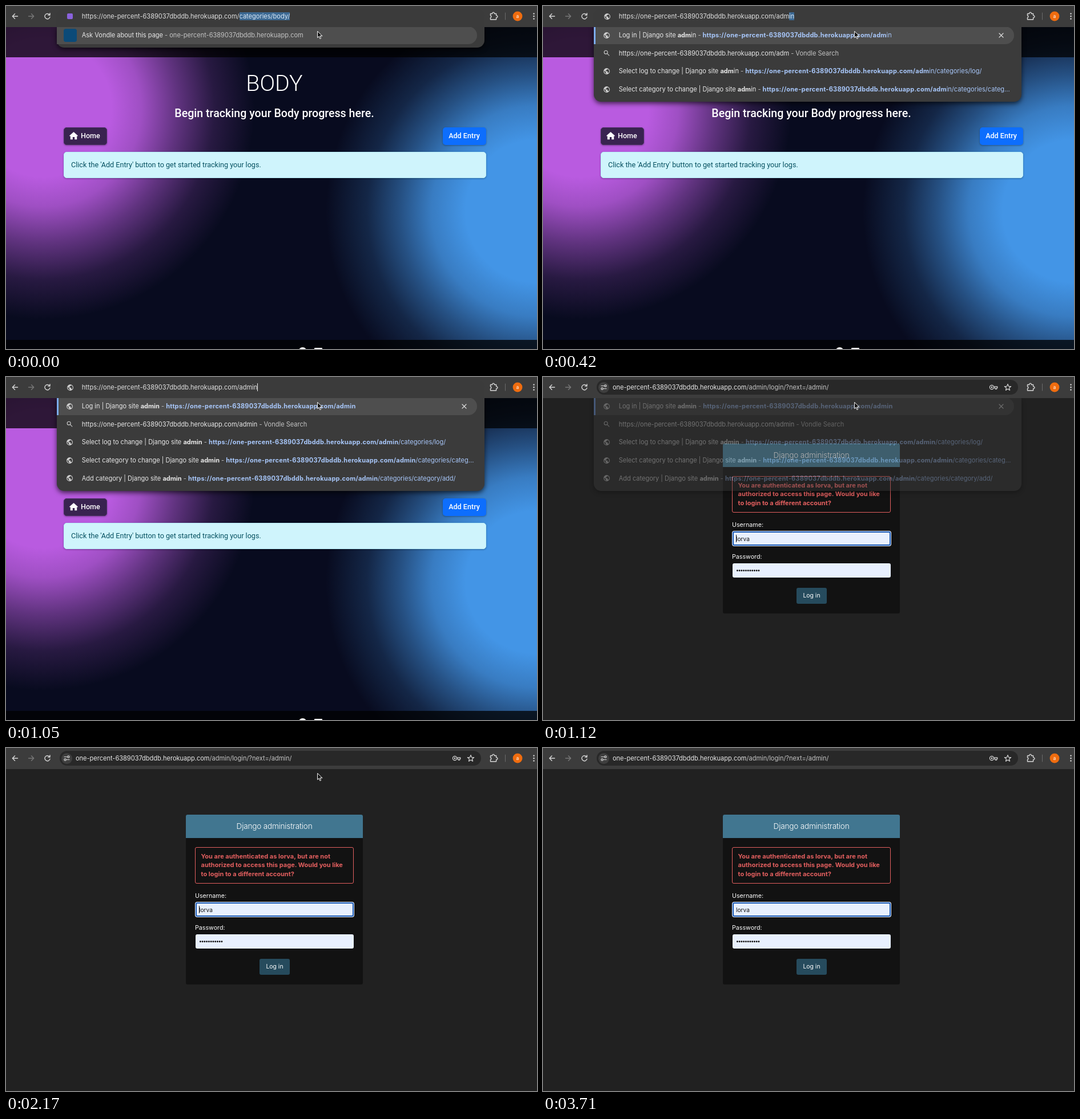
Animation, 930 px wide and 602 px high, one loop 3920 ms. Source, as an HTML page:

```html
<!DOCTYPE html>
<html lang="en">
<head>
<meta charset="utf-8">
<title>Admin page access</title>
<style>
html, body { margin: 0; width: 100%; height: 100%; overflow: hidden; background: #212121; }
#stage { position: absolute; left: 0; top: 0; width: 930px; height: 602px; overflow: hidden;
  font: 11.03px/20px Inter, sans-serif; color: #e8e8e8; }
#stage div, #stage p, #stage svg { position: absolute; box-sizing: border-box; margin: 0; }
p { white-space: pre; }
svg { overflow: visible; fill: none; stroke-linecap: round; stroke-linejoin: round; }

#site, #login { inset: 0; }
#site { font-family: Roboto, sans-serif; font-size: 12.6px; color: #fff;
  background:
    radial-gradient(circle at 65px 180px, #b95be0 120px, #b95be0d9 172px, #b95be080 235px, #b95be02e 300px, #b95be000 370px),
    radial-gradient(circle at 930px 360px, #4395e6 125px, #4395e6d1 185px, #4395e680 240px, #4395e633 298px, #4395e600 370px),
    #080b1f; }
.bar { left: 0; width: 930px; background: #000000bf; }
.center { left: 0; width: 940px; text-align: center; }
.button { border-radius: 5px; box-shadow: 0 1px 3px #0005; }
.dot { background: #fff; }

#login { background: #212121; color: #fff; }
#card { left: 315px; top: 117px; width: 310px; height: 298px; border-radius: 3px; background: #121212; overflow: hidden; }
#card > .head { left: 0; top: 0; width: 310px; height: 41px; background: #417690;
  font-size: 13.6px; font-weight: 300; letter-spacing: -.2px; line-height: 41px; text-align: center; }
#card > .error { left: 16px; top: 56.5px; width: 278px; height: 64px; border: 1px solid #e35f5f; border-radius: 3px; }
#card > .error p { left: 9.5px; top: 8px; font-size: 11px; font-weight: 700; line-height: 15.5px; color: #e35f5f; }
#card > .label { left: 16px; font-size: 10.7px; }
.field { left: 16.5px; width: 277px; height: 25px; border-radius: 3px; background: #e8f0fe; color: #111; }
.focus { border: 2px solid #1557b5; box-shadow: 0 0 0 1px #f4f8ff; }

#popup { left: 88.6px; top: 37px; width: 749px; background: #3b3b3b; border-radius: 0 0 13px 13px;
  box-shadow: 0 3px 9px #000a; }
#active { left: 0; top: -1px; width: 736.4px; height: 31px; border-radius: 0 16px 16px 0; background: #4e4e4e; }
#active.picked { border-left: 3px solid #7cacf8; }
#rows p { left: 44.1px; }
#rows svg { left: 16.9px; }
#rows i, #pill .path { font-style: normal; color: #c4c4c4; }
#rows em { font-style: normal; color: #a8c7fa; }
#rows em b { letter-spacing: .2px; }

#toolbar { left: 0; top: 0; width: 930px; height: 37px; background: #3c3c3c; }
#edit { left: 88px; top: 5px; width: 750px; height: 32px; border-radius: 13px 13px 0 0; background: #3b3b3b; color: #e0e0e0; }
#pill { left: 94px; top: 5px; width: 738px; height: 26px; border-radius: 13px; background: #282828; }
mark { background: #3c6993; color: #dcebfa; }
.typing { border-right: 1px solid #eee; }
</style>
</head>
<body>
<div id="stage">
  <div id="site">
    <div class="bar" style="top:37px;height:53px"></div>
    <p class="center" style="top:115px;line-height:42px;font-size:39.4px;font-weight:300">BODY</p>
    <p class="center" style="top:178.7px;font-size:19.6px;font-weight:500">Begin tracking your Body progress here.</p>
    <div class="button" style="left:100.5px;top:212.5px;width:76px;height:31px;background:#392350;border:1px solid #4a3163">
      <svg style="left:9px;top:7.5px" width="15" height="14"><path fill="#fff" d="M7.5 0 15 6.8l-.9.9-.9-.7v6.2H9.2V9H5.8v4.2H1.8V7l-.9.7-.9-.9z"/></svg>
      <p style="left:29.5px;top:4.5px;font-weight:500">Home</p>
    </div>
    <div class="button" style="left:764.5px;top:212.5px;width:76px;height:31px;background:#0d6efd">
      <p style="left:0;width:76px;top:5.5px;text-align:center;font-weight:500">Add Entry</p>
    </div>
    <div class="button" style="left:100.5px;top:255.5px;width:740px;height:46px;background:#cff4fc;border:1px solid #b9effa;color:#055160">
      <p style="left:12.5px;top:12px">Click the 'Add Entry' button to get started tracking your logs.</p>
    </div>
    <div class="bar" style="top:586px;height:16px"></div>
    <div class="dot" style="left:512px;top:599px;width:15px;height:15px;border-radius:8px"></div>
    <div class="dot" style="left:540px;top:600px;width:14px;height:14px;border-radius:1px"></div>
  </div>

  <div id="login">
    <div id="card">
      <div class="head">Django administration</div>
      <div class="error"><p>You are authenticated as lorva, but are not
authorized to access this page. Would you like
to login to a different account?</p></div>
      <p class="label" style="top:132.5px">Username:</p>
      <div class="field focus" style="top:154px"><p style="left:4.5px;top:1px;font-size:10.2px">lorva</p></div>
      <div id="caret" style="left:23px;top:160px;width:1px;height:13px;background:#111"></div>
      <p class="label" style="top:188.5px">Password:</p>
      <div class="field" style="top:210px"><svg id="secret" width="60" height="25" fill="#111"></svg></div>
      <div style="left:129px;top:253px;width:53px;height:28px;border-radius:3px;background:#264b5d;text-align:center;font-size:10.4px;line-height:28px">Log in</div>
    </div>
  </div>

  <div id="popup"><div id="active"></div><div id="rows"></div></div>

  <div id="toolbar">
    <svg width="930" height="37" stroke="#d6d6d6" stroke-width="1.4">
      <path d="M20.5 18H11.5M15.5 13.8 11.3 18l4.2 4.2"/>
      <path stroke="#777" d="M39.5 18h9M44.5 13.8 48.7 18l-4.2 4.2"/>
      <path d="M76.3 15.5A4.6 4.6 0 1 0 77 19.2M77 12.8v3.3h-3.3"/>
      <path d="M848.5 13.5h3.2a1.9 1.9 0 1 1 3.7 0h3.2v3.2a1.9 1.9 0 1 1 0 3.7v3.3h-10.1v-3.3a1.9 1.9 0 0 0 0-3.7z"/>
      <path stroke="#6a6a6a" stroke-width="1" d="M874.5 12v12"/>
      <circle cx="896" cy="18" r="8.4" fill="#ef6c0f" stroke="none"/>
      <path stroke-width="2.6" d="M924.5 13.5v0M924.5 18v0M924.5 22.5v0"/>
    </svg>
    <p style="left:888px;width:16px;top:7.5px;text-align:center;font-size:8.5px;color:#fff">a</p>
    <div id="edit">
      <div id="favicon" style="left:19px;top:8px;width:10px;height:10px;border-radius:2px;background:#8a62dc"></div>
      <svg id="globe" style="left:17.5px;top:6.5px" width="13" height="13" viewBox="0 0 24 24"></svg>
      <p id="url" style="left:44.7px;top:3px"></p>
    </div>
    <div id="pill">
      <div style="left:3px;top:3.5px;width:19px;height:19px;border-radius:10px;background:#3f3f3f"></div>
      <svg width="738" height="26" stroke="#d6d6d6" stroke-width="1.2">
        <path d="M8 10.5h4.5M12.5 15.5H17"/><circle cx="15.3" cy="10.5" r="1.7"/><circle cx="9.6" cy="15.5" r="1.7"/>
        <circle cx="692" cy="13" r="3.6"/><circle cx="692" cy="13" r=".8"/><path d="M695.5 11.8h6.3v2.4h-1.2v2h-2.4v-2h-2.7"/>
        <path id="star"/>
      </svg>
      <p style="left:28px;top:3px">one-percent-6389037dbddb.herokuapp.com<span class="path">/admin/login/?next=/admin/</span></p>
    </div>
  </div>

  <svg id="pointer" width="10" height="15"><path fill="#111" stroke="#fff" stroke-width="1" d="M.6.7V11.6L3.1 9.3 4.9 13.5 6.7 12.7 4.9 8.6H8.5z"/></svg>
</div>

<script>
const $ = id => document.getElementById(id);
const LOOP = 3920, STEP = 70, LOGIN_AT = 1120;
const HOST = 'one-percent-6389037dbddb.herokuapp.com';
const WORD = 'admin';

// [time, letters typed, suggestion count]
const TYPING = [[0, 0, 0], [210, 1, 4], [350, 2, 4], [420, 3, 4], [490, 4, 4], [560, 5, 5]];
const FADE = [[0, 1], [LOGIN_AT, .4], [1190, .15], [1260, 0]];
const CARET = [[0, 1], [1610, 0], [2170, 1], [2660, 0], [3220, 1], [3710, 0]];
const PATH = [[2450, 545, 44], [2520, 544, 50], [2590, 541, 68], [2660, 536, 92], [2730, 536, 92],
  [2800, 526, 163], [2870, 514, 251], [3010, 504, 412], [3150, 497, 522], [3290, 492, 578],
  [3430, 481, 597], [3500, 478, 620]];
const PAGES = [
  ['Log in', ''],
  null,
  ['Select log to change', '/categories/log/'],
  ['Select category to change', '/categories/categ...'],
  ['Add category', '/categories/category/add/']
];

const GLOBE = '<path fill="#cfcfcf" d="M12 2a10 10 0 1 0 0 20 10 10 0 0 0 0-20zm-1 17.9c-4-.5-7-3.8-7-7.9l.2-1.8L9 15v1a2 2 0 0 0 2 2zm6.9-2.5A2 2 0 0 0 16 16h-1v-3a1 1 0 0 0-1-1H8v-2h2a1 1 0 0 0 1-1V7h2a2 2 0 0 0 2-2v-.4a8 8 0 0 1 2.9 12.8z"/>';
const LENS = '<g stroke="#cfcfcf" stroke-width="2"><circle cx="9.5" cy="9.5" r="5.5"/><path d="m14 14 6 6"/></g>';

const icon = (art, y) => `<svg style="top:${y - 6.5}px" width="13" height="13" viewBox="0 0 24 24">${art}</svg>`;
const line = (html, y) => `<p style="top:${y - 10}px">${html}</p>`;
const at = (table, t) => table.findLast(row => row[0] <= t);

function along(path, t) {
  const i = path.findIndex(p => p[0] > t);
  if (i === 0) return path[0].slice(1);
  if (i < 0) return path.at(-1).slice(1);
  const [a, b] = [path[i - 1], path[i]];
  const k = (t - a[0]) / (b[0] - a[0]);
  return [1, 2].map(n => a[n] + (b[n] - a[n]) * k);
}

function suggestions(typed, count) {
  if (!count) {
    return '<div style="left:12.4px;top:3px;width:23px;height:23px;border-radius:4px;background:#0b4a78"></div>' +
      line(`Ask Vondle about this page<i> - ${HOST}</i>`, 14);
  }
  const rest = WORD.slice(typed.length);
  const rows = PAGES.slice(0, count).map((page, i) => {
    const y = 14 + i * 31.7;
    if (!page) return icon(LENS, y) + line(`https://${HOST}/${typed}<i> - Vondle Search</i>`, y);
    const [title, tail] = page;
    return icon(GLOBE, y) + line(`${title} | Django site <b>${typed}</b>${rest}<i> - </i>` +
      `<em><b>https://${HOST}/${typed}</b>${rest}${tail}</em>`, y);
  });
  const close = '<svg style="left:710.4px;top:10.5px" width="7" height="7" stroke="#ddd" stroke-width="1.2"><path d="M0 0 7 7M7 0 0 7"/></svg>';
  return rows.join('') + close;
}

let shown;
function showTyping(letters, count) {
  if (shown === letters) return;
  shown = letters;
  const typed = WORD.slice(0, letters);
  const selected = letters ? WORD.slice(letters) : 'categories/body/';
  $('url').innerHTML = `https://${HOST}/${typed}` +
    (selected ? `<mark>${selected}</mark>` : '<span class="typing"></span>');
  $('favicon').hidden = letters > 0;
  $('globe').style.display = letters ? '' : 'none';
  $('active').className = letters ? 'picked' : '';
  $('rows').innerHTML = suggestions(typed, count);
  $('popup').style.height = (count ? 5 + count * 31.6 : 36) + 'px';
}

function draw(time) {
  const t = Math.floor(time % LOOP / STEP) * STEP;
  const loggingIn = t >= LOGIN_AT;
  const [, letters, count] = at(TYPING, t);
  showTyping(letters, count);
  $('site').hidden = $('edit').hidden = loggingIn;
  $('login').hidden = $('pill').hidden = !loggingIn;
  $('popup').style.opacity = at(FADE, t)[1];
  $('caret').style.opacity = at(CARET, t)[1];
  const [x, y] = along(PATH, t);
  $('pointer').style.transform = `translate(${x}px,${y}px)`;
}

$('globe').innerHTML = GLOBE;
$('secret').innerHTML = Array.from({ length: 11 }, (_, i) =>
  `<circle cx="${8.4 + i * 3.75}" cy="12.8" r="1.45" fill="#111"/>`).join('');
$('star').setAttribute('d', 'M' + Array.from({ length: 10 }, (_, i) => {
  const r = i % 2 ? 2.6 : 6, a = i * Math.PI / 5;
  return `${720 + r * Math.sin(a)} ${13.4 - r * Math.cos(a)}`;
}).join('L') + 'z');

const start = performance.now();
function tick() {
  draw(performance.now() - start);
  requestAnimationFrame(tick);
}
tick();
</script>
</body>
</html>
```
